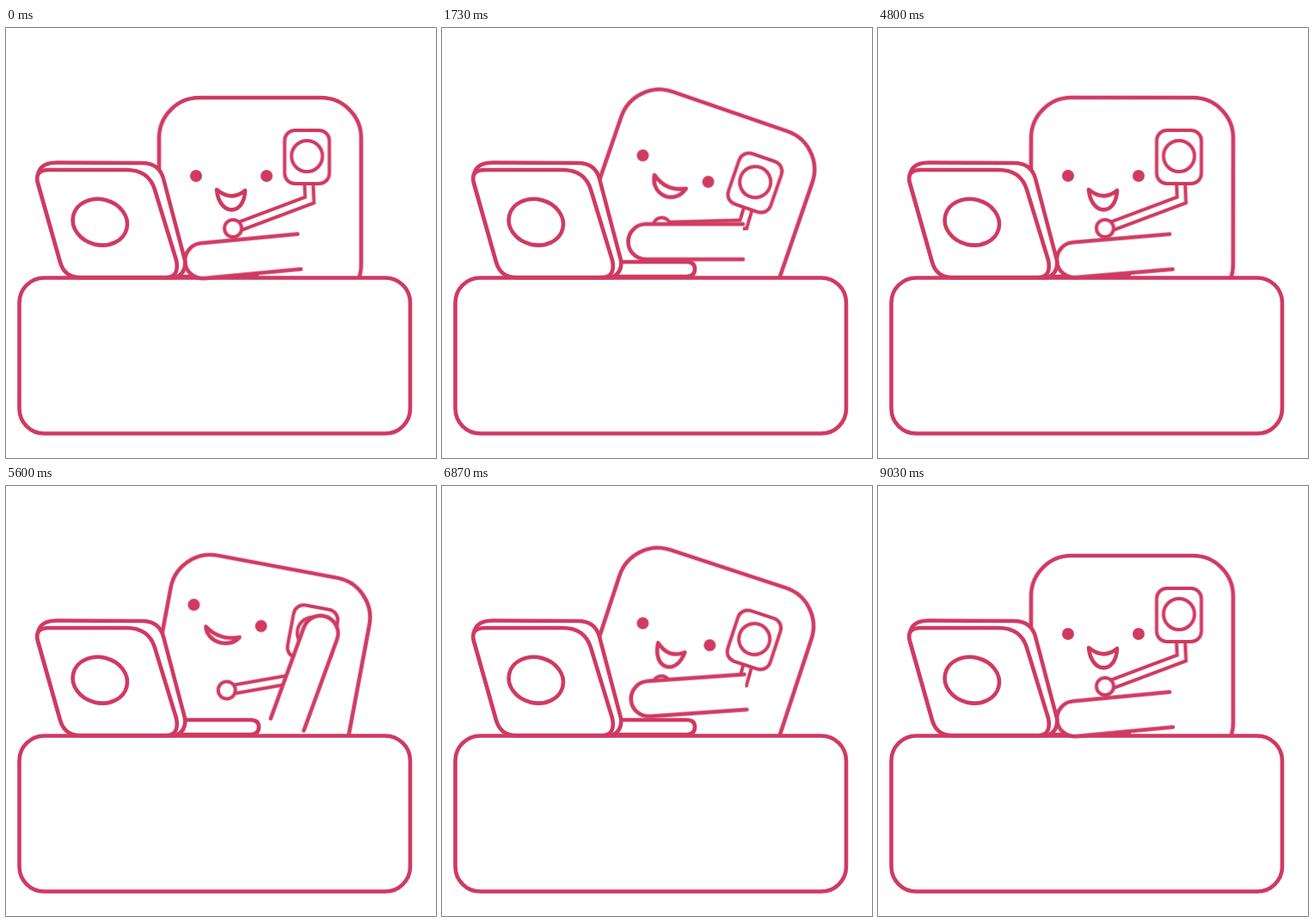
An HTML page that plays this animation: 500 px wide and 500 px high, repeating every 9530 ms.

```html
<!DOCTYPE html>
<html lang="en">
<head>
<meta charset="utf-8">
<title>Headset helper at a desk</title>
<style>
html, body { margin: 0; width: 100%; height: 100%; overflow: hidden; background: #fff; }
svg { display: block; width: 100%; height: 100%; }
svg * { transform-origin: 0 0; }

.line { fill: #fff; stroke: #d03a62; stroke-width: 4.6; stroke-linecap: round; stroke-linejoin: round; }
.thin { stroke-width: 4; }
.eye { fill: #d03a62; }
.tube { fill: none; stroke: #d03a62; stroke-width: 14; stroke-linejoin: miter; }
.bore { stroke: #fff; stroke-width: 6; }

/* The gesture plays twice per 9530 ms loop */
#head, #face, #mouth, #arm { animation: 4765ms ease-in-out infinite; }
#head { animation-name: tilt; }
#face { animation-name: look; }
#mouth { animation-name: smile; }
#arm { animation-name: reach; }

@keyframes tilt {
  0%, 59%, 100% { transform: translate(295.5px, 128px) rotate(0deg); }
  9.4% { transform: translate(299px, 121px) rotate(4deg); }
  17.4% { transform: translate(307px, 140px) rotate(10.6deg); }
  23% { transform: translate(319px, 141px) rotate(18.5deg); }
  36.3% { transform: translate(319.5px, 141.5px) rotate(19deg); }
  44.1% { transform: translate(318px, 141px) rotate(18.2deg); }
}
@keyframes look {
  0%, 1%, 44.1%, 100% { transform: translate(-33.5px, 44px) rotate(0deg); }
  14%, 22% { transform: translate(-46.7px, 19.4px) rotate(7deg); }
  36.3% { transform: translate(-38.2px, 36.4px) rotate(3deg); animation-timing-function: ease-out; }
}
@keyframes smile {
  0%, 2%, 44.1%, 100% { d: path("M-17 16Q0 30 16 17C15 47 -14 47 -17 16Z"); }
  15%, 24% { d: path("M-20 20Q0 31 21 20C14 37 -14 37 -20 20Z"); }
  36.3% { d: path("M-20 16Q0 29 20 17C15 40 -15 40 -20 16Z"); animation-timing-function: ease-out; }
}
@keyframes reach {
  0%, 59%, 100% { transform: translate(341px, 260px) rotate(-5.4deg); }
  15%, 22% { transform: translate(327px, 277.5px) rotate(110deg); }
  33%, 36.3% { transform: translate(350px, 248.5px) rotate(0deg); }
  44.1% { transform: translate(353px, 239.5px) rotate(-4deg); }
}
</style>
</head>
<body>
<svg viewBox="0 0 500 500">
  <g id="head">
    <rect class="line" x="-117.5" y="-47" width="235" height="241" rx="47"/>
    <g id="face">
      <circle class="eye" cx="-41" r="7"/>
      <circle class="eye" cx="41" r="7"/>
      <path id="mouth" class="line" d="M-17 16Q0 30 16 17C15 47 -14 47 -17 16Z"/>
    </g>
    <path class="tube" d="M56.5 50L57.5 72L-25 103"/>
    <path class="tube bore" d="M56.5 50L57.5 72L-25 103"/>
    <circle class="line thin" cx="-31.5" cy="105" r="10"/>
    <rect class="line thin" x="28.5" y="-9" width="52" height="62" rx="12"/>
    <circle class="line thin" cx="54.5" cy="21" r="18"/>
  </g>

  <rect class="line" x="15.5" y="290.5" width="454.5" height="181" rx="29"/>
  <path class="line" d="M205 272H284Q294 272 294 280Q294 289 284 289H200"/>
  <path id="arm" class="line" d="M0 -20.5H-113A20.5 20.5 0 0 0 -113 20.5H0"/>

  <g class="laptop">
    <path class="line" d="M37 180Q34 156 60 156.5L158 157Q178 157 183 175L208 270Q210 284 198 290H86Q68 290 63 272Z"/>
    <path class="line" d="M37 180Q33 165 50 165L140 165Q166 165 173 188L198 270Q202 290 186 290H86Q68 290 63 272Z"/>
    <ellipse class="line" cx="109.3" cy="225.7" rx="32" ry="26.5" transform="rotate(14 109.3 225.7)"/>
  </g>
</svg>
</body>
</html>
```
